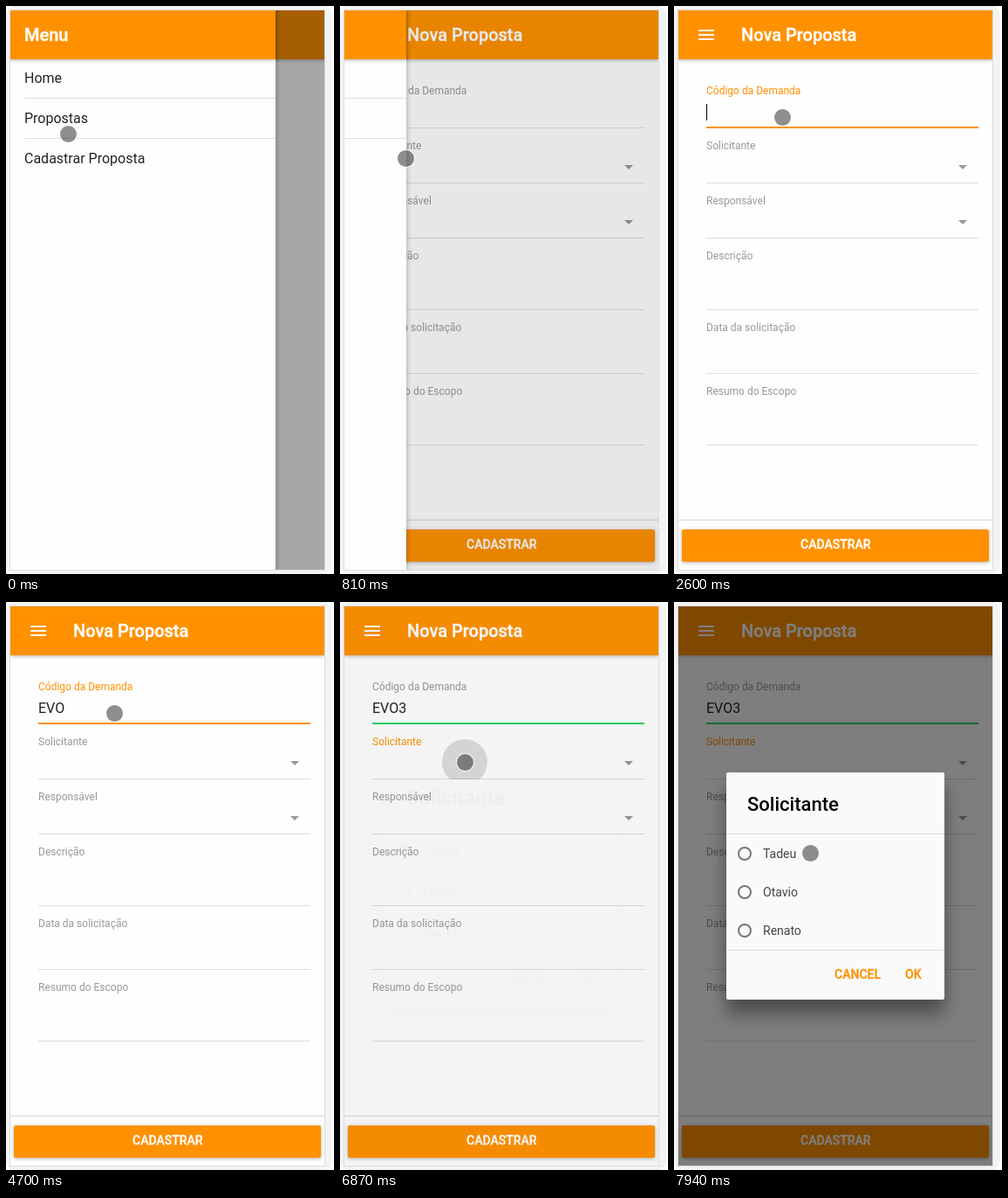
Write an HTML page that moves like this. It is 376 px wide and 650 px high and loops after 8000 ms.

```html
<!DOCTYPE html>
<html lang="pt">
<head>
<meta charset="utf-8">
<title>Nova Proposta</title>
<style>
  html, body { margin: 0; width: 100%; height: 100%; overflow: hidden; background: #fff; }
  svg { display: block; width: 376px; height: 650px; font-family: Roboto, Arial, sans-serif; }
  .bar { fill: #ff9100; filter: drop-shadow(0 1px 2px rgba(0,0,0,.3)); }
  .title { font-size: 20px; font-weight: 500; fill: #fff; stroke: #fff; stroke-width: .4; }
  .item { font-size: 16px; fill: #222; }
  .label { font-size: 12px; fill: #999; }
  .line { fill: #dedede; }
  .button { font-size: 14px; font-weight: 500; stroke-width: .3; }
  .white { fill: #fff; stroke: #fff; }
  .orange { fill: #ff9100; stroke: #ff9100; }
  .option { font-size: 14px; fill: #444; }
  .radio { fill: none; stroke: #777; stroke-width: 2; }
  #panel { filter: drop-shadow(0 0 3px rgba(0,0,0,.3)); }
  #box { filter: drop-shadow(0 16px 10px rgba(0,0,0,.4)); }
</style>
</head>
<body>
<svg viewBox="0 0 376 650">
  <defs>
    <clipPath id="screen"><rect x="5" y="5" width="360" height="640"/></clipPath>
    <clipPath id="row"><rect x="5" y="140" width="360" height="63"/></clipPath>
  </defs>
  <rect width="374" height="650" rx="10" fill="#f3f3f3"/>
  <rect x="4.5" y="4.5" width="361" height="641" fill="#fefefe" stroke="#dcdcdc"/>
  <g clip-path="url(#screen)">
    <rect class="bar" x="5" y="5" width="360" height="56"/>
    <g id="page">
      <path d="M28 28h18M28 33h18M28 38h18" stroke="#fff" stroke-width="2"/>
      <text class="title" x="77" y="40">Nova Proposta</text>
      <g id="fields"></g>
      <rect id="focus" x="37" y="138" width="312" height="2"/>
      <text id="code" class="item" x="37" y="127"></text>
      <rect id="caret" y="112" width="1" height="19"/>
      <g clip-path="url(#row)"><circle id="ripple" cx="143" cy="183" fill="#000" fill-opacity=".13"/></g>
      <rect id="scroll" x="359" y="64" width="3" height="454" rx="1.5"/>
      <rect x="5" y="587" width="360" height="1" fill="#f0f0f0"/>
      <rect x="5" y="588" width="360" height="1" fill="#dedede"/>
      <rect class="bar" x="9" y="599" width="352" height="37" rx="2"/>
      <text class="button white" x="185.3" y="621" text-anchor="middle">CADASTRAR</text>
    </g>
    <rect id="shade" x="5" y="5" width="360" height="640"/>
    <g id="menu">
      <rect id="panel" x="5" y="-10" width="304" height="670" fill="#fefefe"/>
      <rect class="bar" x="5" y="5" width="304" height="56"/>
      <text class="title" x="21" y="40">Menu</text>
      <g id="items"></g>
    </g>
    <g id="dialog">
      <rect id="box" x="60" y="195" width="250" height="260" rx="2" fill="#fafafa"/>
      <text x="84" y="239" font-size="22" font-weight="500">Solicitante</text>
      <rect class="line" x="60" y="265" width="250" height="1"/>
      <g id="options"></g>
      <rect class="line" x="60" y="398" width="250" height="1"/>
      <text class="button orange" x="184" y="431">CANCEL</text>
      <text class="button orange" x="265" y="431">OK</text>
    </g>
  </g>
  <g id="touch">
    <circle r="10" fill="none" stroke="#fff" stroke-opacity=".6" stroke-width="1.5"/>
    <circle r="9.5" fill="#323232" fill-opacity=".55"/>
  </g>
</svg>
<script>
const LOOP = 8000;
const STEP = 134; // movement is shown in steps of this many ms
const BLINK = 530;
const FOCUS = 1530, PRESS = 6750;
const ORANGE = '#ff9100', GREEN = '#32d264';

const $ = id => document.getElementById(id);
const set = (id, attrs) => {
  for (const key in attrs) $(id).setAttribute(key, attrs[key]);
};
const build = (id, list, make) => { $(id).innerHTML = list.map(make).join(''); };

const ramp = (t, from, to) => Math.min(1, Math.max(0, (t - from) / (to - from)));
const smooth = u => u * u * (3 - 2 * u);
const easeOut = u => 1 - (1 - u) ** 2;

build('items', ['Home', 'Propostas', 'Cadastrar Proposta'], (name, i) =>
  `<text class="item" x="21" y="${88 + 46 * i}">${name}</text>` +
  (i < 2 ? `<rect class="line" x="21" y="${105 + 46 * i}" width="288" height="1"/>` : ''));

// Each field: label, distance from its baseline to the underline, arrow.
const fields = [
  ['Código da Demanda', 38], ['Solicitante', 38, true], ['Responsável', 38, true],
  ['Descrição', 57], ['Data da solicitação', 48], ['Resumo do Escopo', 57]
];
let y = 76;
build('fields', fields, ([name, drop, arrow], i) => {
  const base = y + 25;
  y = base + drop;
  return `<text class="label" id="label${i}" x="37" y="${base}">${name}</text>
    <rect class="line" x="37" y="${y}" width="312" height="1"/>` +
    (arrow ? `<path d="M326 ${y - 20}h10l-5 5z" fill="#999"/>` : '');
});

build('options', ['Tadeu', 'Otavio', 'Renato'], (name, i) =>
  `<circle class="radio" cx="81" cy="${288 + 44 * i}" r="7"/>
   <text class="option" x="102" y="${293 + 44 * i}">${name}</text>`);

const glides = [
  { from: 0, to: 268, x: 75.5, y: 174.5 },
  { from: 804, to: 938, x: 80.5, y: 166.5 },
  { from: 938, to: 1340, x: 124.5, y: 127.5 },
  { from: 5920, to: 6298, x: 143.5, y: 183.5 },
  { from: 7630, to: 7906, x: 156.5, y: 287.5 }
];
const keys = [3280, 3930, 4160, 5810];

function moveTouch(step) {
  let x = 71.5, y = 146.5;
  for (const g of glides) {
    const p = smooth(ramp(step, g.from, g.to));
    x += (g.x - x) * p;
    y += (g.y - y) * p;
  }
  set('touch', { transform: `translate(${x} ${y})` });
}

function moveMenu(step) {
  const p = easeOut(ramp(step, 660, 955));
  set('menu', { transform: `translate(${Math.round(-316 * p)} 0)` });
  return .35 * (1 - p);
}

function openDialog(step) {
  const p = smooth(ramp(step, 6800, 7000));
  set('dialog', {
    opacity: p ** 1.5,
    transform: `translate(185 325) scale(${1 + .085 * (1 - p)}) translate(-185 -325)`
  });
  set('ripple', { r: p < .5 ? Math.max(0, (step - 6640) * .134) : 0 });
  return .5 * p;
}

function fillCode(t) {
  const pressed = keys.filter(key => key <= t);
  $('code').textContent = 'EVO3'.slice(0, pressed.length);
  const since = pressed.length ? pressed.at(-1) : FOCUS;
  const focused = t >= FOCUS && t < PRESS;
  const lit = focused && Math.floor((t - since) / BLINK) % 2 === 0;
  set('caret', { x: Math.round(37 + $('code').getComputedTextLength()), opacity: +lit });
  set('focus', { fill: t < FOCUS ? 'none' : focused ? ORANGE : GREEN });
  $('label0').style.fill = focused ? ORANGE : '';
  $('label1').style.fill = t >= PRESS ? ORANGE : '';
}

function draw(t) {
  const step = Math.floor(t / STEP) * STEP;
  moveTouch(step);
  fillCode(t);
  set('shade', { opacity: moveMenu(step) + openDialog(step) });
  set('page', { visibility: t < 670 ? 'hidden' : 'visible' });
  set('scroll', { opacity: t < FOCUS ? 0 : .3 * (1 - ramp(t, 1950, 2200)) });
}

const start = performance.now();
function tick() {
  draw((performance.now() - start) % LOOP);
  requestAnimationFrame(tick);
}
tick();
</script>
</body>
</html>
```
